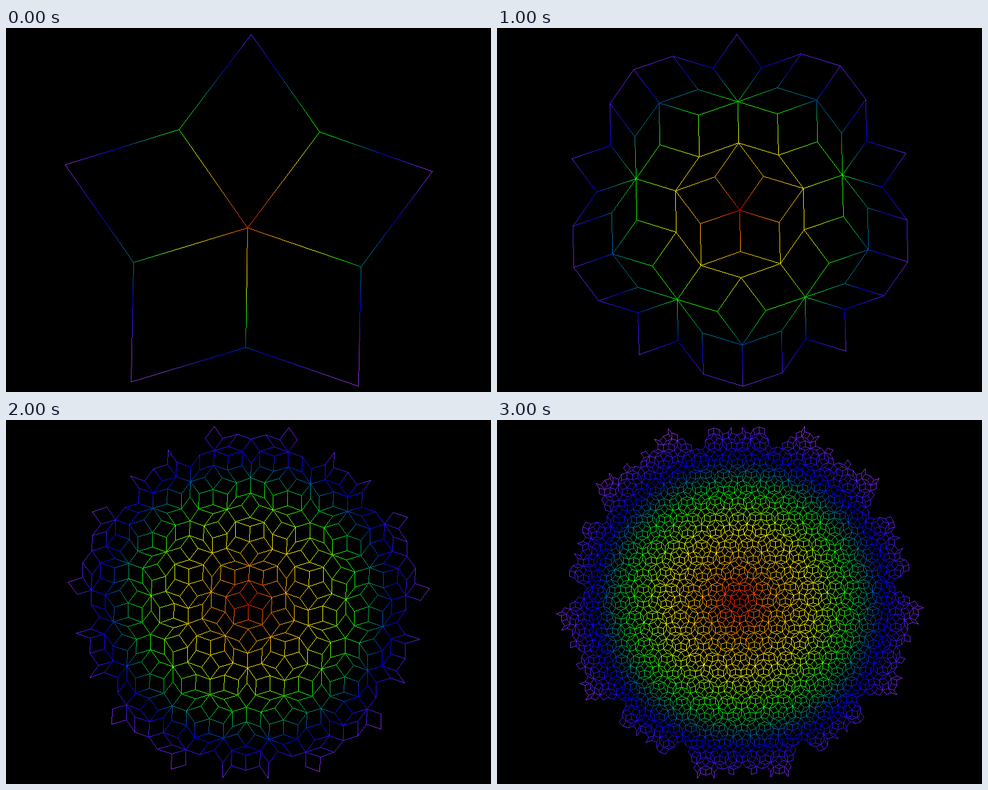
Animation of 800 by 600 pixels, one loop 3500 ms. Source, as an HTML page with a canvas:

```html
<!DOCTYPE html>
<html lang="en">
<head>
<meta charset="utf-8">
<title>Penrose tiling</title>
<style>
  html, body { margin: 0; width: 100%; height: 100%; overflow: hidden; background: #000; }
  canvas { display: block; }
</style>
</head>
<body>
<canvas id="stage" width="800" height="600"></canvas>
<script>
const W = 800, H = 600, MARGIN = 10, RADIUS = 300;
const STEP_MS = 500, LEVELS = 7;
const RULES = {
  6: '81++91----71[-81----61]++',
  7: '+81--91[---61--71]+',
  8: '-61++71[+++81++91]-',
  9: '--81++++61[+91++++71]--71',
  1: ''
};
const STOPS = [[255, 0, 0], [255, 165, 0], [255, 255, 0], [0, 255, 0], [0, 0, 255], [138, 43, 226]];
const ctx = document.getElementById('stage').getContext('2d');

const expand = s => s.replace(/[16789]/g, c => RULES[c]);

// Turtle walk with unit steps; returns segments as [x0, y0, x1, y1].
function trace(program, heading) {
  const segments = [], stack = [];
  let x = 0, y = 0, turns = 0;
  for (const c of program) {
    if (c === '1') {
      const a = (heading + turns * 36) * Math.PI / 180;
      const nx = x + Math.cos(a), ny = y - Math.sin(a);
      segments.push([x, y, nx, ny]);
      x = nx;
      y = ny;
    } else if (c === '+') turns++;
    else if (c === '-') turns--;
    else if (c === '[') stack.push([x, y, turns]);
    else if (c === ']') [x, y, turns] = stack.pop();
  }
  return segments;
}

// Scale and centre the segments inside the stage margins, on whole pixels.
function fit(segments) {
  let x0 = 0, x1 = 0, y0 = 0, y1 = 0;
  for (const [, , x, y] of segments) {
    x0 = Math.min(x0, x); x1 = Math.max(x1, x);
    y0 = Math.min(y0, y); y1 = Math.max(y1, y);
  }
  const k = Math.min((W - 2 * MARGIN) / (x1 - x0), (H - 2 * MARGIN) / (y1 - y0));
  const px = x => Math.round(W / 2 + (x - (x0 + x1) / 2) * k);
  const py = y => Math.round(H / 2 + (y - (y0 + y1) / 2) * k);
  return segments.map(([ax, ay, bx, by]) => [px(ax), py(ay), px(bx), py(by)]);
}

function rainbow(x, y) {
  const last = STOPS.length - 1;
  const t = Math.min(1, Math.hypot(x - W / 2, y - H / 2) / RADIUS) * last;
  const i = Math.min(last - 1, Math.floor(t));
  return STOPS[i].map((v, j) => v + (STOPS[i + 1][j] - v) * (t - i));
}

// Hard-edged one-pixel lines.
function render(segments) {
  const image = ctx.createImageData(W, H), data = image.data;
  for (let i = 3; i < data.length; i += 4) data[i] = 255;
  for (const [x0, y0, x1, y1] of segments) {
    const dx = x1 - x0, dy = y1 - y0;
    const n = Math.max(Math.abs(dx), Math.abs(dy), 1);
    for (let i = 0; i <= n; i++) {
      const x = Math.round(x0 + dx * i / n), y = Math.round(y0 + dy * i / n);
      data.set(rainbow(x, y), (y * W + x) * 4);
    }
  }
  return image;
}

const images = [];
let program = '[7]++[7]++[7]++[7]++[7]';
for (let n = 1; n <= LEVELS; n++) {
  program = expand(program);
  // The first edge turns by 36 degrees every second level.
  const odd = Math.floor(n / 2) % 2 === 0;
  images.push(render(fit(trace(program, odd ? 17 : 55))));
}

let shown = -1;
function tick() {
  const i = Math.floor(performance.now() / STEP_MS) % LEVELS;
  if (i !== shown) ctx.putImageData(images[shown = i], 0, 0);
  requestAnimationFrame(tick);
}
tick();
</script>
</body>
</html>
```
